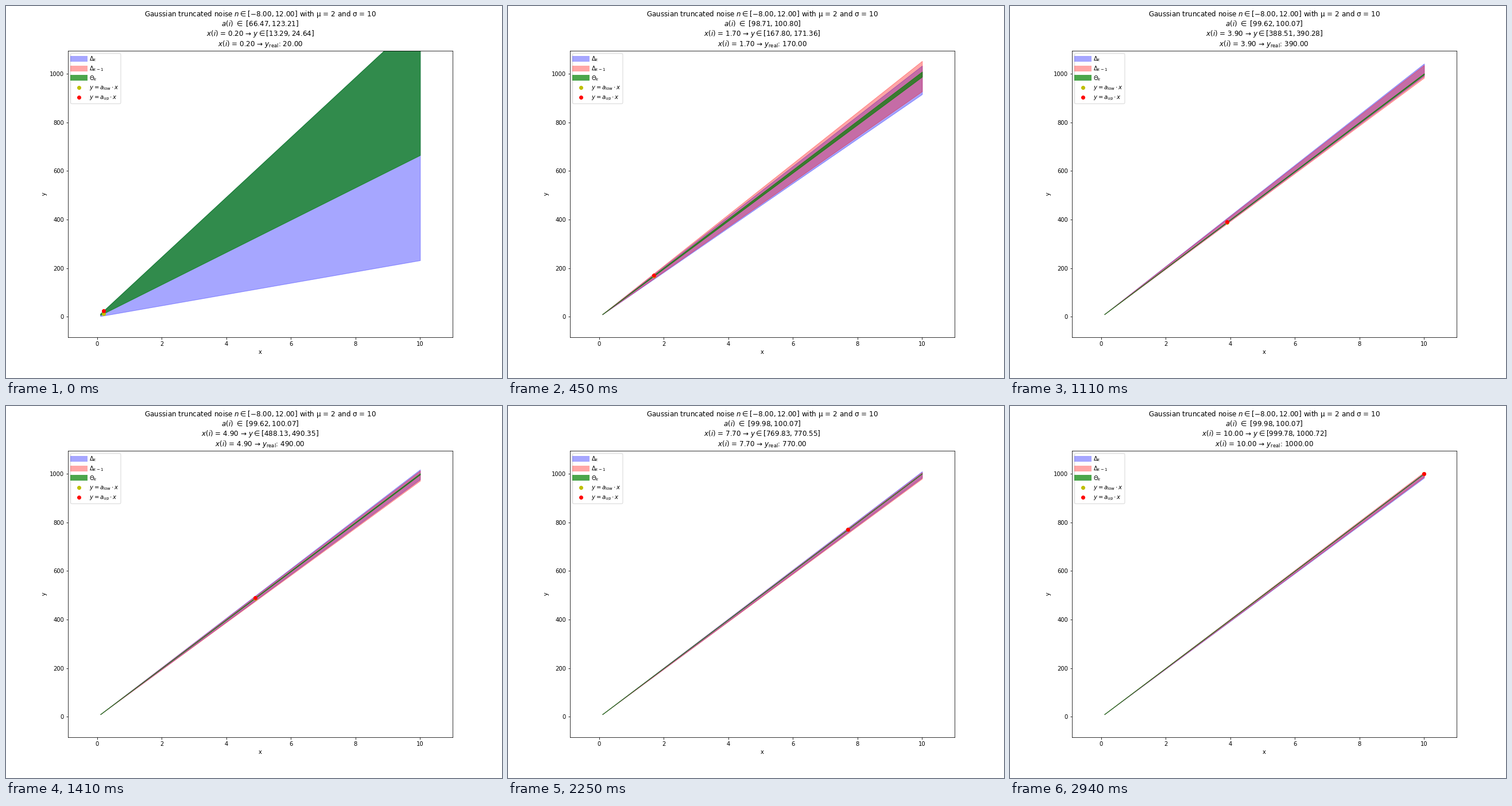
Animation, 864 px wide and 648 px high, one loop 2.97 s. Source, as a matplotlib script:

```python
import numpy as np
import matplotlib.pyplot as plt
from matplotlib.animation import FuncAnimation
from matplotlib.lines import Line2D
from matplotlib.patches import FancyBboxPatch
from matplotlib.transforms import Affine2D

W, H = 864, 648
LOW, HIGH, SLOPE = -8.0, 12.0, 100.0
X0, X1, COUNT = 0.1, 10.0, 100

# Samples at which the slope bounds tighten, and the new bound.
LOW_STEPS = {1: 66.47, 6: 98.708, 32: 99.6181, 67: 99.978}
UP_STEPS = {1: 266.47, 2: 123.21, 5: 100.8, 18: 100.0718}


def staircase(steps):
    out = np.empty(COUNT)
    for k, bound in steps.items():
        out[k - 1:] = bound
    return out


x = np.linspace(X0, X1, COUNT)
width = (HIGH - LOW) / x
theta_low, theta_up = staircase(LOW_STEPS), staircase(UP_STEPS)

# Each sample's band covers theta; a share of 0 or 1 touches one bound.
share = np.random.default_rng(8).uniform(0, 1, COUNT)
share[[k - 1 for k in UP_STEPS]] = 0
share[[k - 1 for k in LOW_STEPS]] = 1
floor = theta_up - width
delta_low = floor + share * (theta_low - floor)
delta_up = delta_low + width

fig, ax = plt.subplots(figsize=(W / 72, H / 72), dpi=72)
ax.set_xlim(X0 - 1, X1 + 1)
ax.set_ylim(-83.36, 1094.6)
ax.set_xlabel("x")
ax.set_ylabel("y")
# Pixels from the top left corner.
pixels = Affine2D().scale(1 / W, -1 / H).translate(0, 1) + fig.transFigure


def add_band(color, alpha):
    return ax.fill_between([X0, X1], [0, 0], [0, 0], color=color, alpha=alpha)


def set_band(band, low, up):
    band.set_verts([[(X0, up * X0), (X0, low * X0),
                     (X1, low * X1), (X1, up * X1)]])


now = add_band("b", 0.35)
before = add_band("r", 0.35)
theta = add_band("g", 0.7)
dot_low, = ax.plot([], [], "yo")
dot_up, = ax.plot([], [], "ro")


def draw_legend(left=112.6, top=82.8, box_w=87.4, box_h=87.4, pitch=16.6):
    ax.add_artist(FancyBboxPatch(
        (left, top), box_w, box_h, boxstyle="round,pad=0,rounding_size=2",
        fc="white", ec="0.8", alpha=0.8, transform=pixels, zorder=5))
    bar = dict(lw=10)
    dot = dict(marker="o", ls="none")
    rows = [
        (r"$\Delta_k$", "b", 0.35, bar),
        (r"$\Delta_{k-1}$", "r", 0.35, bar),
        (r"$\Theta_k$", "g", 0.7, bar),
        (r"$y = a_{\mathrm{low}} \cdot x$", "y", 1, dot),
        (r"$y = a_{\mathrm{up}} \cdot x$", "r", 1, dot),
    ]
    for i, (label, color, alpha, style) in enumerate(rows):
        mid = top + 9.3 + i * pitch
        xs = [left + 4, left + 24] if style is bar else [left + 14]
        ax.add_artist(Line2D(xs, [mid] * len(xs), color=color, alpha=alpha,
                             transform=pixels, zorder=6, **style))
        ax.text(left + 32, mid + 3.5, label, transform=pixels, zorder=6)


draw_legend()
title = [ax.text(442.8, base, "", fontsize=12, ha="center", va="baseline",
                 transform=pixels) for base in (18, 35, 52, 70)]


def update(i):
    k = i + 1
    xi, low, up = x[k], theta_low[k], theta_up[k]
    set_band(now, delta_low[k], delta_up[k])
    set_band(before, delta_low[k - 1], delta_up[k - 1])
    before.set_visible(i > 0)
    set_band(theta, low, up)
    dot_low.set_data([xi], [low * xi])
    dot_up.set_data([xi], [up * xi])
    lines = [
        rf"Gaussian truncated noise $n \in [{LOW:.2f}, {HIGH:.2f}]$"
        " with μ = 2 and σ = 10",
        rf"$a(i)$ $\in$ $[{low:.2f}, {up:.2f}]$",
        rf"$x(i)$ = {xi:.2f} → $y \in [{low * xi:.2f}, {up * xi:.2f}]$",
        rf"$x(i)$ = {xi:.2f} → $y_{{\mathrm{{real}}}}$: {SLOPE * xi:.2f}",
    ]
    for text, line in zip(title, lines):
        text.set_text(line)
    return now, before, theta, dot_low, dot_up, *title


anim = FuncAnimation(fig, update, frames=COUNT - 1, interval=30,
                     repeat=True, repeat_delay=0, blit=False)
plt.show()
```
